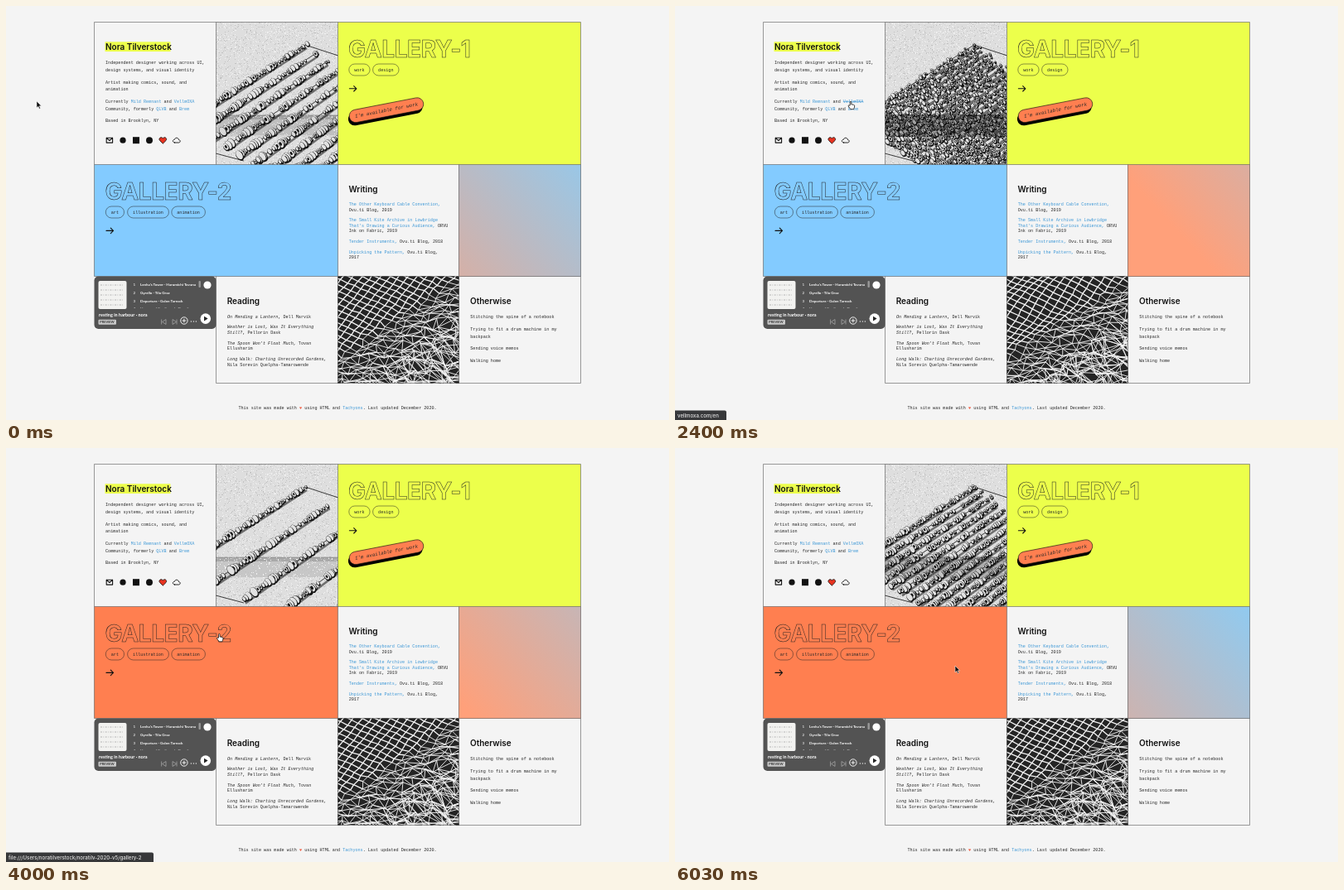
Write an HTML page with a canvas that moves like this. It is 800 px wide and 500 px high and loops after 6.16 s.

```html
<!DOCTYPE html>
<html lang="en">
<head>
<meta charset="utf-8">
<title>Portfolio</title>
<style>
html, body { margin: 0; width: 100%; height: 100%; overflow: hidden; background: #f4f4f4; }
canvas, svg { position: absolute; left: 0; top: 0; width: 800px; height: 500px; }
text { white-space: pre; fill: #282828; }
.mono { font: 5.12px "Liberation Mono", monospace; }
.head { font: 600 10px Inter, sans-serif; fill: #111; }
.hero { font: 700 28px Inter, sans-serif; letter-spacing: -.4px; fill: none; stroke: #222; stroke-width: .5px; }
.bar { font: 500 6.1px Inter, sans-serif; fill: #e4e4e4; }
.song { font: 700 4.5px Lato, sans-serif; fill: #fff; }
.link { fill: #3c97d6; }
.on { text-decoration: line-through; }
.book { font-style: italic; }
.line { fill: none; stroke: #222; stroke-width: .5; }
.icon { fill: none; stroke: #111; stroke-width: 1.1; stroke-linejoin: round; stroke-linecap: round; }
</style>
</head>
<body>
<canvas id="art" width="800" height="500"></canvas>
<svg id="page" viewBox="0 0 800 500"></svg>
<script>
const LOOP = 6160, STEP = 100;
const YELLOW = '#ecff4b', BLUE = '#83cbff', CORAL = '#ff7f50';
const page = document.getElementById('page');
const ctx = document.getElementById('art').getContext('2d');
const $ = id => document.getElementById(id);

// Page
const text = (x, y, s, cls = 'mono', more = '') => `<text x="${x}" y="${y}" class="${cls}" ${more}>${s}</text>`;
const link = (s, id = '') => `<tspan class="link" ${id && `id="${id}"`}>${s}</tspan>`;
const book = s => `<tspan class="book">${s}</tspan>`;
const rect = (x, y, w, h, more) => `<rect x="${x}" y="${y}" width="${w}" height="${h}" ${more}/>`;
const dot = (x, y, r, fill) => `<circle cx="${x}" cy="${y}" r="${r}" fill="${fill}"/>`;
const path = (d, more) => `<path d="${d}" ${more}/>`;
const column = (x, rows) => rows.map(([y, s]) => text(x, y, s)).join('');
const chip = (x, y, s) => rect(x, y, s.length * 3.072 + 13, 14, 'rx="7" class="line"') + text(x + 6.5, y + 8.7, s);
const arrow = (x, y) => path(`M${x} ${y}h8.5m-3.2-3.2l3.2 3.2l-3.2 3.2`, 'class="icon"');

const about = column(120, [
  [70.2, 'Independent designer working across UI,'],
  [79, 'design systems, and visual identity'],
  [93.6, 'Artist making comics, sound, and'],
  [102.2, 'animation'],
  [116.7, `Currently ${link('Mild Remnant', 'linkA')} and ${link('VellmOXA', 'linkB')}`],
  [125.6, `Community, formerly ${link('QLVB')} and ${link('Brem')}`],
  [140.2, 'Based in Brooklyn, NY']
]);

const icons =
  path('M121.2 159.3h7.4v5.8h-7.4zl3.7 3.2l3.7-3.2', 'class="icon"') +
  dot(141, 162.2, 3.6, '#111') +
  rect(153, 158.2, 8, 8, 'fill="#111"') +
  dot(173, 162.2, 4, '#111') +
  path('M189.3 166.2l-3.7-3.7c-2.2-2.6 1.6-5.4 3.7-2.7c2.1-2.7 5.9.1 3.7 2.7z', 'fill="#e8321f" stroke="#222" stroke-width=".9"') +
  path('M203.5 165h5c2.4-.2 2.1-3.4 0-3.3c-.5-3.2-4.5-3.2-5.1-.4c-2.8 0-2.8 3.6.1 3.7z', 'class="icon" style="stroke-width:.9"');

const writing = column(413.7, [
  [241.2, link('The Other Keyboard Cable Convention,')],
  [247.8, 'Ovu.ti Blog, 2019'],
  [260, link('The Small Kite Archive in Lowbridge')],
  [266.7, link("That's Drawing a Curious Audience,") + ' ORVU'],
  [273.3, 'Ink on Fabric, 2019'],
  [286.2, link('Tender Instruments,') + ' Ovu.ti Blog, 2018'],
  [298.6, link('Unpicking the Pattern,') + ' Ovu.ti Blog,'],
  [305.2, '2017']
]);

const reading = column(267, [
  [376.6, book('On Mending a Lantern') + ', Dell Marvik'],
  [389.2, book('Weather is Lost, Was It Everything')],
  [395.9, book('Still?') + ', Pellorin Dask'],
  [408.7, book("The Spoon Won't Float Much") + ', Tovan'],
  [415.3, 'Ellusharim'],
  [427.8, book('Long Walk: Charting Unrecorded Gardens,')],
  [434.6, 'Nila Sorevin Quelpha-Tamarowende']
]);

const otherwise = column(560.3, [
  [377.4, 'Stitching the spine of a notebook'],
  [392.2, 'Trying to fit a drum machine in my'],
  [400.9, 'backpack'],
  [415.4, 'Sending voice memos'],
  [430, 'Walking home']
]);

const songs = ["Lenka's Tower · Harumichi Tovana", 'Gyrello · Tilo Graz', 'Departure · Galen Tarrock', 'Houses of Cardboard · Timothea'];
const marks = [0, 1, 2, 3, 4].map(i => `M114 ${337 + i * 6}h28`).join('');
const player =
  rect(106.5, 326.5, 147, 63.5, 'rx="5" fill="#535353"') +
  rect(111.5, 332, 34, 34, 'rx="2" fill="#f2f2f0"') +
  path(marks, 'stroke="#999" stroke-width=".7" stroke-dasharray="2 1.3 .8 1.6"') +
  '<clipPath id="list"><path d="M150 329h90v36h-90z"/></clipPath><g clip-path="url(#list)">' +
  songs.map((s, i) => text(153.5, 338.3 + i * 9.7, i + 1, 'song', 'opacity=".8"') +
    text(162, 338.3 + i * 9.7, s, 'song', i > 2 ? 'opacity=".6"' : '')).join('') + '</g>' +
  rect(232.5, 332, 2.4, 8, 'rx="1" fill="#999"') +
  dot(243, 337, 4.6, '#fff') +
  text(112, 374.8, 'resting in harbour · nora', 'song', 'style="font-size:5.5px"') +
  rect(111.5, 378.7, 21.5, 6, 'rx="1" fill="#c9c9c9"') +
  text(113.3, 383.2, 'PREVIEW', 'song', 'style="font-size:3.9px;fill:#333"') +
  path('M193 378.5v6l-4.5-3zM187.6 378.5v6M201 378.5v6l4.5-3zM206 378.5v6', 'fill="none" stroke="#a5a5a5" stroke-width=".8"') +
  path('M210.7 380a4.2 4.2 0 1 0 8.4 0a4.2 4.2 0 1 0-8.4 0M212.6 380h4.6m-2.3-2.3v4.6', 'fill="none" stroke="#fff" stroke-width=".9"') +
  [223.4, 226.4, 229.4].map(x => dot(x, 381, .75, '#ddd')).join('') +
  dot(240.8, 377.6, 6.3, '#fff') + path('M239 374.8v5.6l4.6-2.8z', 'fill="#222"');

const pill = 'x="-45.5" y="-7.7" width="91" height="15.4" rx="7.7"';
const button =
  `<g transform="translate(457.7 129.4) rotate(-11)"><rect ${pill} fill="#000"/></g>
   <g transform="translate(459 125.7) rotate(-11)"><rect ${pill} fill="${CORAL}" stroke="#111" stroke-width=".6"/>` +
  text(0, 2, "I'm available for work", 'mono', 'text-anchor="middle" style="font-size:5.86px;font-style:italic"') + '</g>';

page.innerHTML =
  rect(400.5, 19.5, 293, 172, 'id="panel1"') + rect(106.5, 191.5, 294, 135, 'id="panel2"') +
  path('M106.5 326.5v-307h587v436h-440v-129M253.5 19.5v172M106.5 191.5h587M106.5 326.5h587M400.5 19.5v436M546.5 191.5v264',
    'fill="none" stroke="#666" stroke-width=".65"') +
  rect(119.5, 43.3, 79, 11.7, `fill="${YELLOW}"`) + text(120, 52.7, 'Nora Tilverstock', 'head') +
  about + icons +
  text(413, 62, 'GALLERY-1', 'hero') + chip(413.8, 70, 'work') + chip(442.6, 70, 'design') + arrow(414.4, 99.8) + button +
  text(119.5, 233.7, 'GALLERY-2', 'hero') + chip(120.3, 242, 'art') + chip(146.6, 242, 'illustration') + chip(199.8, 242, 'animation') + arrow(121, 271.4) +
  text(413.5, 224.5, 'Writing', 'head') + writing +
  text(266.7, 360, 'Reading', 'head') + reading +
  text(560, 360, 'Otherwise', 'head') + otherwise + player +
  text(400, 487, `This site was made with <tspan fill="#f0553a">♥</tspan> using HTML and ${link('Tachyons')}. Last updated December 2020.`, 'mono', 'text-anchor="middle"') +
  `<g id="status">${path('', 'id="statusBox" fill="#37383a"')}${text(3, 496.6, '', 'bar', 'id="statusText"')}</g>` +
  path('M0 0v8l1.9-1.7l1.3 2.9l1.3-.6l-1.3-2.8h2.5z', 'id="arrow" fill="#111" stroke="#fff" stroke-width=".5"') +
  path('M-.8 4.6V.6a.8.8 0 0 1 1.6 0v2.7l2.7.5q1.3.3 1.2 1.6l-.5 2.3l-.7 1.5h-3.6l-2.7-3.6q-.5-1 .5-1.1z', 'id="hand" fill="#fff" stroke="#111" stroke-width=".8"');

// Timing tables
const cursorKeys = [[0, 37, 115], [200, 37, 115], [800, 159, 115], [900, 161.5, 117.5], [1300, 164, 117], [1600, 210, 115.5],
  [2400, 212, 115.5], [2900, 214, 115.5], [3300, 441, 132], [3500, 441, 132], [3900, 255, 224], [4200, 262, 226], [4700, 338, 263]];
const statusKeys = [[0], [800, 'instagram.com/mildremnant', 90], [1500, 'vellmoxa.com/en', 62],
  [3100, 'file:///Users/noratilverstock/noratilv-2020-v5/gallery-1', 178],
  [3800, 'file:///Users/noratilverstock/noratilv-2020-v5/gallery-2', 178], [4400]];
// Time, rod count, density
const coilKeys = [[0, 10, .15], [900, 19, .75], [1600, 23, .9], [2400, 25, 1], [2999, 26, 1], [3000, 2, 0],
  [3300, 2, 0], [3600, 3, 0], [4800, 8, .05], [6030, 15, .5]];
const netKeys = [[0, 0], [900, 1], [1600, .1], [2400, .9], [3300, 0], [6030, 0]];
const skyKeys = [[0, .35], [900, .06], [1600, -.03], [2400, -.2], [2800, -.22], [3300, -.14], [4800, .09], [6030, .43]];

function at(keys, t) {
  const i = keys.findIndex(k => k[0] > t);
  if (i < 0) return keys[keys.length - 1].slice(1);
  const a = keys[i - 1], b = keys[i], f = (t - a[0]) / (b[0] - a[0]);
  return a.slice(1).map((v, n) => v + (b[n + 1] - v) * f);
}
const hash = (a, b = 0, c = 0) => {
  const v = Math.sin(a * 127.1 + b * 311.7 + c * 74.7 + 1.3) * 43758.5453;
  return v - Math.floor(v);
};
function inBox(x, y, w, h, draw) {
  ctx.save();
  ctx.beginPath();
  ctx.rect(x, y, w, h);
  ctx.clip();
  draw();
  ctx.restore();
}
function stroke(color, width, ...points) {
  ctx.strokeStyle = color;
  ctx.lineWidth = width;
  ctx.beginPath();
  points.forEach(([x, y]) => ctx.lineTo(x, y));
  ctx.stroke();
}
function ring(x, y, r, angle, fill) {
  ctx.fillStyle = fill;
  ctx.beginPath();
  ctx.ellipse(x, y, r * .62, r, angle, 0, 7);
  ctx.fill();
}

// Rods of rings on a tilted plane
function coils(t) {
  const [n, dark] = at(coilKeys, t);
  ctx.fillStyle = '#dedede';
  ctx.fillRect(253, 19, 148, 173);
  ctx.fillStyle = '#c8c8c8';
  ctx.fillRect(253, 132, 148, 24);
  ctx.fillStyle = '#aaa';
  ctx.fillRect(253, 132, 148, 5);
  for (let i = 0; i < 3600; i++) {
    ctx.fillStyle = hash(i, 3) < .5 ? '#f2f2f2' : '#c2c2c2';
    ctx.fillRect(253 + Math.floor(hash(i, 1) * 148), 19 + Math.floor(hash(i, 2) * 173), 1, 1);
  }
  stroke('#111', .8, [253, 178], [287, 187]);
  stroke('#111', .8, [361, 47], [401, 60]);
  const crowd = n > 4, count = Math.round(44 + 26 * dark), drift = t / 300;
  for (let k = 0; k < n; k++) {
    const i = k * 6.8 / n;
    const x0 = 215 + 24 * i, y0 = 140 + 15 * i, dx = 146 - 5 * i, dy = 9 * i - 93 - 9 * i;
    const angle = Math.atan2(dy, dx);
    if (crowd) stroke('rgba(0,0,0,.5)', 2.5, [x0 + 4, y0 + 4], [x0 + dx + 2, y0 + dy + 4]);
    stroke('#111', .8, [x0, y0], [x0 + dx, y0 + dy]);
    for (let j = count; j >= 0; j--) {
      const u = (j + hash(j, k) * .9) / count;
      const big = crowd || (k && u < .42);
      if (hash(j, k, 5) < (big ? .1 : .35)) continue;
      const pulse = .72 + .28 * Math.sin(j * .8 + k * 2.1 + drift);
      const r = (big ? (crowd ? 5.6 - 2.5 * dark : 7.5) : 3) * pulse * (1.2 - .5 * u);
      const x = x0 + dx * u + (hash(j, k, 1) - .5) * dark * 5;
      const y = y0 + dy * u + (hash(j, k, 2) - .5) * dark * 5;
      ring(x + .5, y + .7, r + .7, angle, '#111');
      ring(x, y, r - .3, angle, '#e2e2e2');
      if (hash(j, k, 3) < .35 + dark * .3) ring(x, y, r * .45, angle, '#161616');
    }
  }
  ctx.fillStyle = `rgba(0,0,0,${.1 + .25 * dark})`;
  ctx.fillRect(253, 131, 148, 2);
  ctx.fillStyle = `rgba(0,0,0,${.28 * dark})`;
  ctx.fillRect(253, 133, 148, 25);
}

// Knotted net, looser towards the lower right
function net(t) {
  const [mix] = at(netKeys, t);
  ctx.fillStyle = '#242424';
  ctx.fillRect(400, 326, 148, 131);
  ctx.strokeStyle = '#f4f4f4';
  const node = (i, j) => {
    const x = 392 + i * 8.2 - j * 4.6, y = 318 + i * 3.6 + j * 5.6;
    const loose = Math.max(0, (x - 400) / 147 * .75 + (y - 327) / 129 - .6);
    const s = 1.5 + Math.min(15, loose * 19);
    const shift = c => (hash(i, j, c) * (1 - mix) + hash(i, j, c + 2) * mix - .5) * s;
    const wave = mix * 2.2 * Math.sin(i * .7 + j * .4);
    return [x + shift(1) + wave, y + shift(2) + wave, s];
  };
  const join = (a, b) => {
    ctx.moveTo(a[0], a[1]);
    ctx.lineTo(b[0], b[1]);
  };
  for (let j = -18; j < 30; j++) {
    for (let i = -4; i < 36; i++) {
      const p = node(i, j);
      if (p[0] < 380 || p[0] > 568 || p[1] < 310 || p[1] > 476) continue;
      ctx.lineWidth = p[2] > 4 ? .9 : 1.3;
      ctx.beginPath();
      join(p, node(i + 1, j));
      join(p, node(i, j + 1));
      if (p[2] > 5) join(p, node(i + 1, j - 1));
      if (p[2] > 10) join(p, node(i + 2, j + 1));
      ctx.stroke();
    }
  }
}

function sky(t) {
  const [from] = at(skyKeys, t), span = 2;
  const point = v => {
    const s = (v - from) * span;
    return [547 + 147 * s, 326 - 135 * s];
  };
  const g = ctx.createLinearGradient(...point(0), ...point(1));
  g.addColorStop(0, '#ffa07a');
  g.addColorStop(1, '#87cefa');
  ctx.fillStyle = g;
  ctx.fillRect(546, 191, 148, 136);
}

function pointer(t) {
  const [x, y] = at(cursorKeys, t);
  const hand = t >= 800 && t < 4400;
  const over = (l, top, r, b) => x > l && x < r && y > top && y < b;
  const place = (id, show) => {
    $(id).setAttribute('transform', `translate(${x} ${y})`);
    $(id).style.display = show ? '' : 'none';
  };
  place('hand', hand);
  place('arrow', !hand);
  $('panel1').setAttribute('fill', over(400, 19, 693, 191) ? CORAL : YELLOW);
  $('panel2').setAttribute('fill', over(107, 191, 400, 326) ? CORAL : BLUE);
  $('linkA').classList.toggle('on', over(150, 110, 189, 120));
  $('linkB').classList.toggle('on', over(202, 110, 229, 120));
  const [, label, width] = statusKeys.filter(k => k[0] <= t).pop();
  $('status').style.display = label ? '' : 'none';
  if (label) {
    $('statusText').textContent = label;
    $('statusBox').setAttribute('d', `M0 488.5h${width - 2}q2 0 2 2v9.5h-${width}z`);
  }
}

let last = -1;
function frame(now) {
  const t = Math.min(Math.floor(now % LOOP / STEP) * STEP, 6030);
  if (t !== last) {
    last = t;
    inBox(253, 19, 148, 173, () => coils(t));
    inBox(400, 326, 147, 130, () => net(t));
    sky(t);
    pointer(t);
  }
  requestAnimationFrame(frame);
}
frame(performance.now());
</script>
</body>
</html>
```
